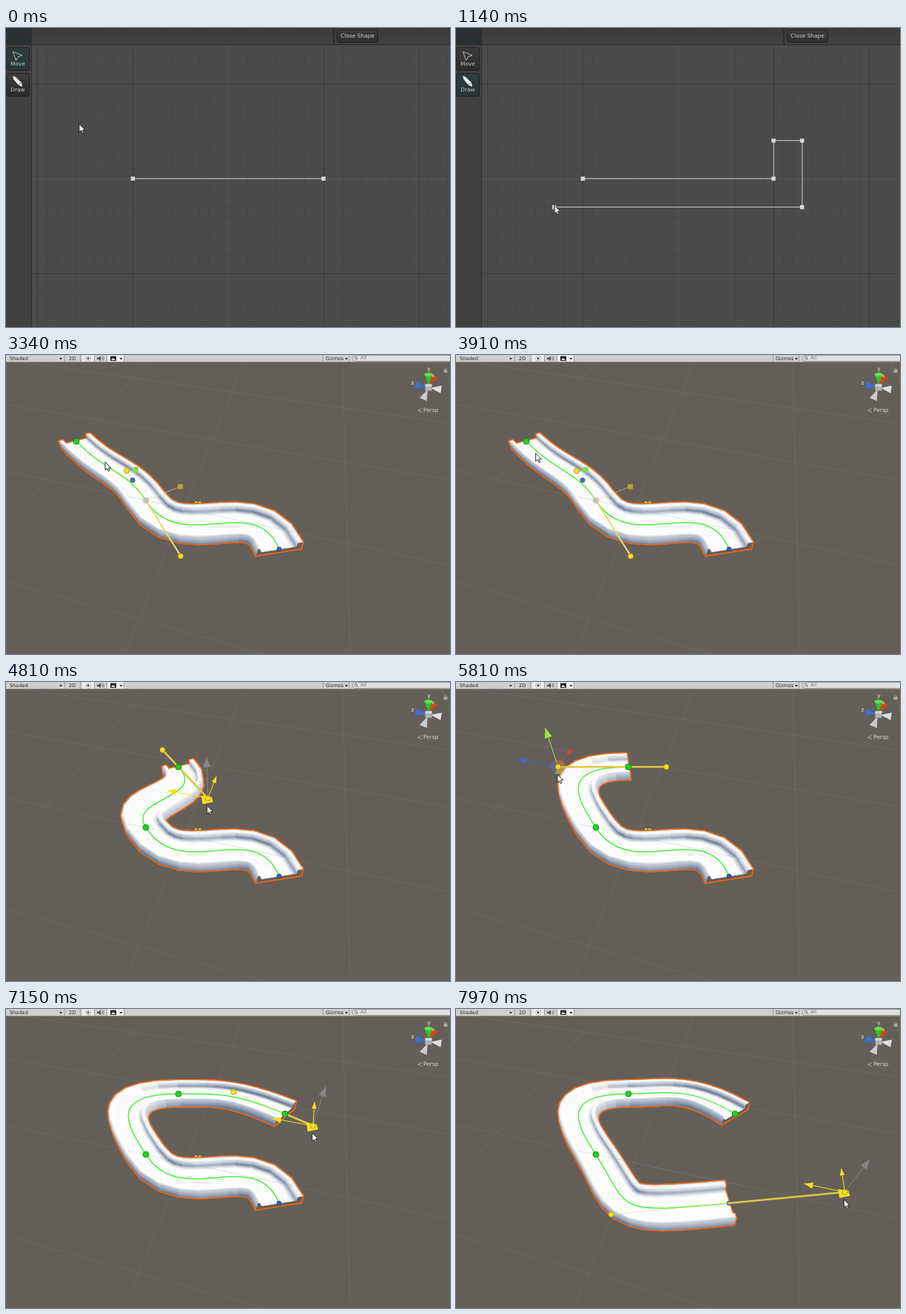
Write an HTML page with a canvas that moves like this. It is 600 px wide and 405 px high and loops after 7990 ms.

```html
<!DOCTYPE html>
<html lang="en">
<head>
<meta charset="utf-8">
<title>Spline mesh editor</title>
<style>
html, body { margin: 0; width: 100%; height: 100%; overflow: hidden; background: #4a4a4a; }
canvas { display: block; width: 600px; height: 405px; }
</style>
</head>
<body>
<canvas id="stage" width="600" height="405"></canvas>
<script>
const c = document.getElementById('stage').getContext('2d');
const LOOP = 7990, CUT = 3270;
const BG = '#645f59', YELLOW = '#f6e11c', GREEN = '#22cf22', INK = '#2a2a2a';

// ---------- helpers ----------
const add = (p, q) => [p[0] + q[0], p[1] + q[1]];
const sub = (p, q) => [p[0] - q[0], p[1] - q[1]];
const mul = (p, k) => [p[0] * k, p[1] * k];
const mix = (p, q, k) => add(p, mul(sub(q, p), k));
const unit = p => mul(p, 1 / (Math.hypot(...p) || 1));
function ease(a, b, t) {
  const k = Math.min(1, Math.max(0, (t - a) / (b - a)));
  return k * k * (3 - 2 * k);
}
// Swing an arm given as [degrees, length]
function swing(from, to, k) {
  const [deg, len] = mix(from, to, k), a = deg * Math.PI / 180;
  return [Math.cos(a) * len, Math.sin(a) * len];
}

function rect(x, y, w, h, fill) { c.fillStyle = fill; c.fillRect(x, y, w, h); }
function trace(pts, close) {
  c.beginPath();
  pts.forEach(p => c.lineTo(...p));
  if (close) c.closePath();
}
function poly(pts, fill) { trace(pts, true); c.fillStyle = fill; c.fill(); }
function line(pts, color, width = 1) {
  trace(pts);
  c.strokeStyle = color; c.lineWidth = width; c.stroke();
}
function arc(p, r, a, b, color) {
  c.beginPath(); c.arc(...p, r, a, b);
  c.strokeStyle = color; c.lineWidth = .8; c.stroke();
}
function ball(p, r, fill, edge = fill) {
  c.beginPath(); c.arc(...p, r, 0, 7);
  c.fillStyle = fill; c.fill();
  c.strokeStyle = edge; c.lineWidth = .8; c.stroke();
}
function text(s, x, y, size, color, align = 'left') {
  c.font = size + 'px "DejaVu Sans", sans-serif';
  c.textAlign = align; c.textBaseline = 'middle';
  c.fillStyle = color; c.fillText(s, x, y);
}
function shade(y, h, top, bottom) {
  const g = c.createLinearGradient(0, y, 0, y + h);
  g.addColorStop(0, top); g.addColorStop(1, bottom);
  return g;
}
function button(x, y, w, h, top, bottom) {
  c.beginPath(); c.roundRect(x + .5, y + .5, w - 1, h - 1, 2.5);
  c.fillStyle = shade(y, h, top, bottom); c.fill();
  c.strokeStyle = '#222'; c.lineWidth = 1; c.stroke();
}
function cursor(p) {
  const pts = [[0, 0], [0, 11], [2.5, 8.7], [4.5, 12.5], [6, 11.6], [4.5, 8], [7.8, 7.8]].map(q => add(p, q));
  poly(pts, '#f4f4f4');
  line(pts.concat([p]), '#1c1c1c', .9);
}

// ---------- profile editor ----------
const UNIT = 128.8;
const onGrid = ([x, h]) => [300.5 + x * UNIT, 204 - h * UNIT];
const profile = [[-1, 0], [1, 0], [1, .4], [1.3, .4], [1.3, -.3], [-1.3, -.3], [-1.3, .4], [-1, .4]];
const placedAt = i => i < 2 ? 0 : 560 + (i - 2) * 180;
const DRAW = 280, CLOSE = 1820, MOVE = 2050, PICK = 2280, DRAG = 2470;
const stops = [[0, [99, 130]], [DRAW, [14, 72]],
  ...profile.map((p, i) => [placedAt(i), onGrid(p)]).slice(2),
  [CLOSE, [470, 11]], [MOVE, [14, 42]], [PICK, [131.5, 152]], [DRAG, [131.5, 152]], [2750, [133.5, 153]], [3210, [97, 172]]];

function pen(t) {
  const i = stops.findLastIndex(s => s[0] <= t), [a, p] = stops[i];
  const [b, q] = stops[i + 1] || stops[i];
  return b > a ? mix(p, q, ease(a + 30, b - 30, t)) : p;
}
function grid() {
  rect(0, 0, 600, 405, '#4b4b4b');
  for (let i = -21; i <= 23; i++) {
    const color = !i ? '#565656' : i % 10 ? '#464646' : '#3d3d3d';
    rect(Math.round(300 + i * UNIT / 10), 22, 1, 383, color);
    rect(35, Math.round(203.5 + i * UNIT / 10), 565, 1, color);
  }
}
function field(name, x, value) {
  text(name, x, 374, 7.2, '#151515');
  rect(x + 7, 369, 37, 9, '#b9b9b9');
  text(value, x + 9, 374, 7.3, '#151515');
}
function frame2d(t) {
  const drawing = t > DRAW && t < MOVE, closed = t > CLOSE, chosen = t > PICK;
  grid();
  rect(0, 0, 600, 22, shade(0, 22, '#3a3a3a', '#424242'));
  rect(0, 0, 35, 22, '#2b3033');
  rect(0, 22, 600, 1, '#2c2c2c');
  rect(442, 0, 2, 22, '#2e2e2e');
  rect(0, 23, 34, 382, '#404040');
  rect(34, 0, 1, 405, '#2d2d2d');

  button(447, 2, 56, 18, ...(closed ? ['#666', '#525252'] : ['#3a3a3a', '#303030']));
  text('Close Shape', 475, 11.5, 7.4, '#c9c9c9', 'center');
  if (chosen) {
    button(40, 2, 61, 18, '#414141', '#333');
    text('Remove Point', 70.5, 11.5, 7.4, '#d0d0d0', 'center');
  }
  const on = ['#2e3c3c', '#263636'], off = ['#3c3c3c', '#2b2b2b'];
  button(0, 26, 32, 32, ...(drawing ? off : on));
  button(0, 61, 32, 32, ...(drawing ? on : off));
  line([[9.5, 32], [22, 37], [16.5, 38.8], [13.5, 44], [9.5, 32]], '#c4c4c4', .9);
  poly([[9, 65], [12.5, 66], [21, 74], [22, 79.5], [17, 77.5], [10.5, 70]], '#e8e8e8');
  line([[17, 77], [20.5, 74]], '#555', .8);
  text('Move', 16, 49, 7.4, '#c8c8c8', 'center');
  text('Draw', 16, 84, 7.4, '#c8c8c8', 'center');

  const slip = [-.015 * (1 - ease(DRAG, 2750, t)), .01];
  const shape = profile.map((p, i) => i === 6 ? add(p, slip) : p).filter((p, i) => t >= placedAt(i));
  const pts = shape.map(onGrid);
  line(closed ? pts.concat([pts[0]]) : pts, '#cfcfcf');
  pts.forEach(([x, y], i) =>
    rect(x - 3, y - 2.7, 5.5, 5.5, !chosen ? '#d6d6d6' : i === 6 ? '#20c020' : '#fff'));

  if (chosen) {
    button(475, 345, 116, 51, '#3f3f3f', '#393939');
    text('Point Position', 532.5, 351.5, 7.3, '#f0f0f0', 'center');
    text('Point 6', 482, 363.5, 7.4, '#151515');
    field('X', 492, String(+shape[6][0].toFixed(3)));
    field('Y', 539, String(+shape[6][1].toFixed(3)));
  }
  cursor(pen(t));
}

// ---------- scene: motion ----------
const N0 = [369, 263], N1 = [189, 197];
const grips = [
  { key: 'n2', start: 4060, end: 4560 }, { key: 'in2', start: 4660, end: 5430 },
  { key: 'n3', start: 6200, end: 6750 }, { key: 'out3', start: 6820, end: 7290 },
  { key: 'out0', start: 7540, end: 7970 }];
const LEAD = 60, JOIN = grips[2].start - LEAD;

function pose(t) {
  const k = grips.map(g => ease(g.start, g.end, t));
  const n2 = mix([95, 117], [233, 115], k[0]);
  const n3 = mix([340, 72], [377, 142], k[2]);
  const a2 = swing([46, 58], [180, 95], ease(4780, 5430, t));
  const a3 = swing([-7, 41], [31, 41], k[3]);
  const a0 = swing([68, 84], [-5.5, 157], k[4]);
  return {
    n0: N0, out0: add(N0, a0), in0: sub(N0, mul(a0, 1.02)),
    n2, in2: add(n2, a2), out2: sub(n2, mul(a2, .54)),
    n3, out3: add(n3, a3), in3: sub(n3, mul(a3, 1.85))
  };
}
function hand(t) {
  const tip = (g, at) => add(pose(at)[g.key], [-1, 10]);
  const i = grips.findIndex(g => t < g.end);
  if (i < 0) return tip(grips.at(-1), t);
  const g = grips[i], last = grips[i - 1];
  if (t >= g.start) return tip(g, t);
  const leave = Math.max(last ? last.end : 0, g.start - 380);
  return mix(last ? tip(last, last.end) : [134, 145], tip(g, g.start), ease(leave, g.start, t));
}

// ---------- scene: mesh ----------
const HORIZON = -295;
const SIDE = [447, HORIZON], AWAY = [-2122, HORIZON], BELOW = [285, 560];

// Half of the section: x, height, darkness; the other half is its mirror
const half = [[0, 0, 0], [.65, 0, 0], [1, 0, 1], [1, .4, .35], [1.13, .4, 0], [1.3, .4, .5], [1.3, -.3, 1]];
const section = [...half.slice(1).reverse().map(([x, h, d]) => [-x, h, d]), ...half];
section.push(section[0]);

// A cross-section of the path, with the ground seen in perspective
function rib([p, q, r, s], k) {
  const pq = mix(p, q, k), qr = mix(q, r, k), rs = mix(r, s, k);
  const a = mix(pq, qr, k), b = mix(qr, rs, k), mid = mix(a, b, k), t = sub(b, a);
  const depth = mid[1] - HORIZON, skew = -.16, squash = 1.6 * (558 / depth) ** 2.4;
  const n = [-(skew * t[0] + squash * t[1]), t[0] + skew * t[1]];
  const len = Math.sqrt(n[0] ** 2 + 2 * skew * n[0] * n[1] + squash * n[1] ** 2) || 1;
  const size = 24.5 * depth / 558;
  return { p: mid, across: mul(n, size / len), n: unit(n), up: mul(sub(mid, BELOW), size / 600) };
}
const place = (r, [x, h]) => add(r.p, add(mul(r.across, x), mul(r.up, h)));

function mesh(curves) {
  const STEPS = 11, PARTS = 4, ribs = [], hull = [], faces = [];
  curves.forEach((cv, j) => {
    for (let i = j ? 1 : 0; i <= STEPS; i++) ribs.push(rib(cv, i / STEPS));
  });
  const quad = (r, q, u, v) => [place(r, u), place(r, v), place(q, v), place(q, u)];
  for (let i = 1; i < ribs.length; i++) {
    const r = ribs[i - 1], q = ribs[i];
    for (let j = 1; j < section.length; j++) {
      const u = section[j - 1], v = section[j], x = (u[0] + v[0]) / 2;
      hull.push(quad(r, q, u, v));
      const outer = Math.abs(x) > 1.1, facing = Math.sign(x) * (outer ? 1 : -1);
      const lit = facing * (r.n[0] * -.58 + r.n[1] * .81);
      const dark = outer ? .45 + .55 * Math.max(0, lit) : Math.max(0, lit);
      for (let m = 0; m < PARTS; m++) {
        const e = mix(u, v, m / PARTS), f = mix(u, v, (m + 1) / PARTS);
        const pts = quad(r, q, e, f), d = sub(pts[2], pts[0]), o = sub(pts[3], pts[1]);
        if (d[0] * o[1] >= d[1] * o[0]) continue;
        const k = dark * (u[2] + (v[2] - u[2]) * (m + .5) / PARTS) ** 1.3;
        const z = place(r, [(e[0] + f[0]) / 2, 0])[1] + place(q, [(e[0] + f[0]) / 2, 0])[1];
        faces.push({ pts, z, color: `rgb(${255 - 162 * k},${255 - 144 * k},${255 - 114 * k})` });
      }
    }
  }
  c.lineJoin = 'round';
  const fill = (pts, color, width) => { poly(pts, color); c.strokeStyle = color; c.lineWidth = width; c.stroke(); };
  hull.forEach(h => fill(h, '#f4660c', 3.8));
  hull.forEach(h => fill(h, BG, .4));
  faces.sort((a, b) => a.z - b.z).forEach(f => fill(f.pts, f.color, .7));
}

// ---------- scene: tools ----------
function cone(tip, d, size, color) {
  const base = sub(tip, mul(d, size)), w = mul([-d[1], d[0]], size * .36);
  poly([tip, add(base, w), sub(base, w)], color);
}
function gizmo(p, drag) {
  const axes = [[sub(p, BELOW), drag ? '#858585' : '#9be83a', 56, 14],
    [sub(SIDE, p), drag ? YELLOW : '#d04a28', 32, 9], [sub(AWAY, p), drag ? YELLOW : '#4a68b8', 56, 12]];
  for (const [v, color, len, size] of axes) {
    const d = unit(v), tip = add(p, mul(d, len));
    line([p, tip], color);
    cone(tip, d, size, color);
  }
  if (drag) poly([[-9, -4], [5, -2], [7, 5], [-7, 8]].map(q => add(p, q)), YELLOW);
  else ['90,110,180', '205,110,75', '205,195,80'].forEach((rgb, i) => {
    const side = a => add(p, mul([Math.cos(a), Math.sin(a)], 11));
    poly([p, side(2.1 + i * 2.1), side(3.1 + i * 2.1), side(4.1 + i * 2.1)], `rgba(${rgb},.6)`);
  });
}
const knob = p => ball(p, 3.6, YELLOW, '#a8901c');
const dot = p => ball(p, 4, GREEN, '#118a11');

function bentTool() {
  line([N1, [236, 272]], '#e8dc70', 2.2);
  line([[163, 157], N1, [236, 178]], 'rgba(238,225,120,.6)');
  rect(232, 175, 7, 6.5, '#b5a52a');
  ball([175, 155.5], 3.8, '#85d95a');
  ball([171, 169.5], 3.2, '#4a6aa4');
  ball(N1, 4, 'rgba(185,180,190,.7)');
  knob([163, 157]);
  knob([236, 272.5]);
}
function floorGrid() {
  rect(0, 0, 600, 405, BG);
  const faint = 'rgba(150,152,155,.22)';
  for (let i = -5; i <= 3; i++) line([SIDE, [465 + i * 305, 405]], faint, .8);
  for (let i = -1; i < 3; i++) {
    const h = 1 / (.002212 + i * .00055);
    line([[0, h + HORIZON], [600, h * (1 + 600 / 2122) + HORIZON]], faint, .8);
  }
}
function toolbar() {
  rect(0, 0, 600, 10, '#cfcfcf');
  rect(0, 9, 600, 1, '#8c8c8c');
  for (const x of [103, 137]) rect(x, 0, x > 120 ? 22 : 16, 9, '#ececec');
  text('Shaded', 5, 5, 6.6, INK);
  text('2D', 85, 5, 6.6, INK);
  text('Gizmos', 432, 5, 6.6, INK);
  for (const x of [79, 100, 119, 136, 159, 428, 463]) rect(x, 0, 1, 9, '#a2a2a2');
  for (const x of [74, 155.5, 460]) poly([[x - 2, 4], [x + 2, 4], [x, 6.5]], INK);
  ball([111, 4.7], 1.2, '#555');
  for (let a = 0; a < 6.2; a += Math.PI / 4) rect(110.6 + Math.cos(a) * 3.4, 4.3 + Math.sin(a) * 3.4, .9, .9, '#555');
  poly([[123, 3.5], [125, 3.5], [128, 1.5], [128, 8], [125, 6], [123, 6]], '#555');
  for (const r of [2, 4]) arc([128, 4.7], r, -.8, .8, '#555');
  rect(141, 1.5, 8, 6.5, INK);
  poly([[142, 7], [144.5, 4], [148.5, 7]], '#ddd');
  c.beginPath(); c.roundRect(468, .5, 136, 8, 4);
  c.fillStyle = '#e0e0e0'; c.fill();
  c.strokeStyle = '#8a8a8a'; c.lineWidth = .8; c.stroke();
  arc([473, 4], 1.8, 0, 7, '#666');
  line([[474.3, 5.4], [476, 7]], '#666', .8);
  text('All', 479, 4.6, 6.6, '#777');
}
function compass() {
  const m = [571, 44];
  const arms = [[.45, -.9, '#d0481c'], [.95, .15, '#dde0e0'], [-.4, .9, '#c8cccc'], [-.97, -.2, '#3f6ecb'], [0, -1, '#2cc42c']];
  for (const [x, y, color] of arms) cone(add(m, [x * 3, y * 3]), [-x, -y], 15, color);
  c.beginPath(); c.ellipse(571, 26.5, 5.6, 2.4, 0, 0, 7); c.fillStyle = '#5fe34c'; c.fill();
  rect(566.5, 39.5, 9, 9, '#aeb2b2');
  rect(566.5, 39.5, 9, 3, '#d6d9d9');
  text('y', 571.5, 19.5, 7.4, '#eee', 'center');
  text('z', 549.5, 38.5, 7.4, '#eee', 'center');
  text('x', 577.5, 28, 6.4, '#eee', 'center');
  line([[562, 72.5], [556.5, 75], [562, 77.5]], '#bbb', .8);
  text('Persp', 564, 75.5, 7.5, '#d4d4d4');
  rect(591.5, 20, 5, 4, '#a9a6a2');
  arc([594, 20], 1.7, Math.PI, 0, '#a9a6a2');
}

function frame3d(t) {
  const s = pose(t), grip = grips.findLast(g => t > g.start - LEAD), joined = t > JOIN;
  const curves = [[N0, s.in0, [236, 272], N1], [N1, [163, 157], s.in2, s.n2]];
  if (joined) curves.push([s.n2, s.out2, s.in3, s.n3]);
  floorGrid();
  mesh(curves);
  line([[165, 192], [390, 240]], 'rgba(110,150,190,.32)', .8);
  for (const [p, ...rest] of curves) {
    c.beginPath(); c.moveTo(...p); c.bezierCurveTo(...rest.flat());
    c.strokeStyle = '#4df03c'; c.lineWidth = 1.5; c.stroke();
  }
  const bending = t > grips[4].start;
  if (!bending) for (const x of [255, 260]) rect(x, 198.5, 3.5, 1.8, '#dcd02c');
  ball(N0, 3, bending ? '#7d8ea6' : '#2a62c4', '#27405f');
  if (grip) dot(N1);
  if (joined) dot(s.n3);
  dot(s.n2);

  if (grip) {
    const id = grip.key.at(-1), node = s['n' + id], into = s['in' + id], out = s['out' + id];
    line([node, into], id === '2' ? '#dcc845' : 'rgba(245,225,110,.5)', id === '2' ? 2.6 : 1);
    line([node, out], '#dcc845', 2.6);
    gizmo(s[grip.key], t > grip.start - 20 && t <= grip.end + 10);
    knob(into);
    knob(out);
    if (id !== '0') dot(node);
  } else bentTool();
  compass();
  toolbar();
  cursor(hand(t));
}

function tick(now) {
  const t = now % LOOP;
  (t < CUT ? frame2d : frame3d)(t);
  requestAnimationFrame(tick);
}
requestAnimationFrame(tick);
</script>
</body>
</html>
```
